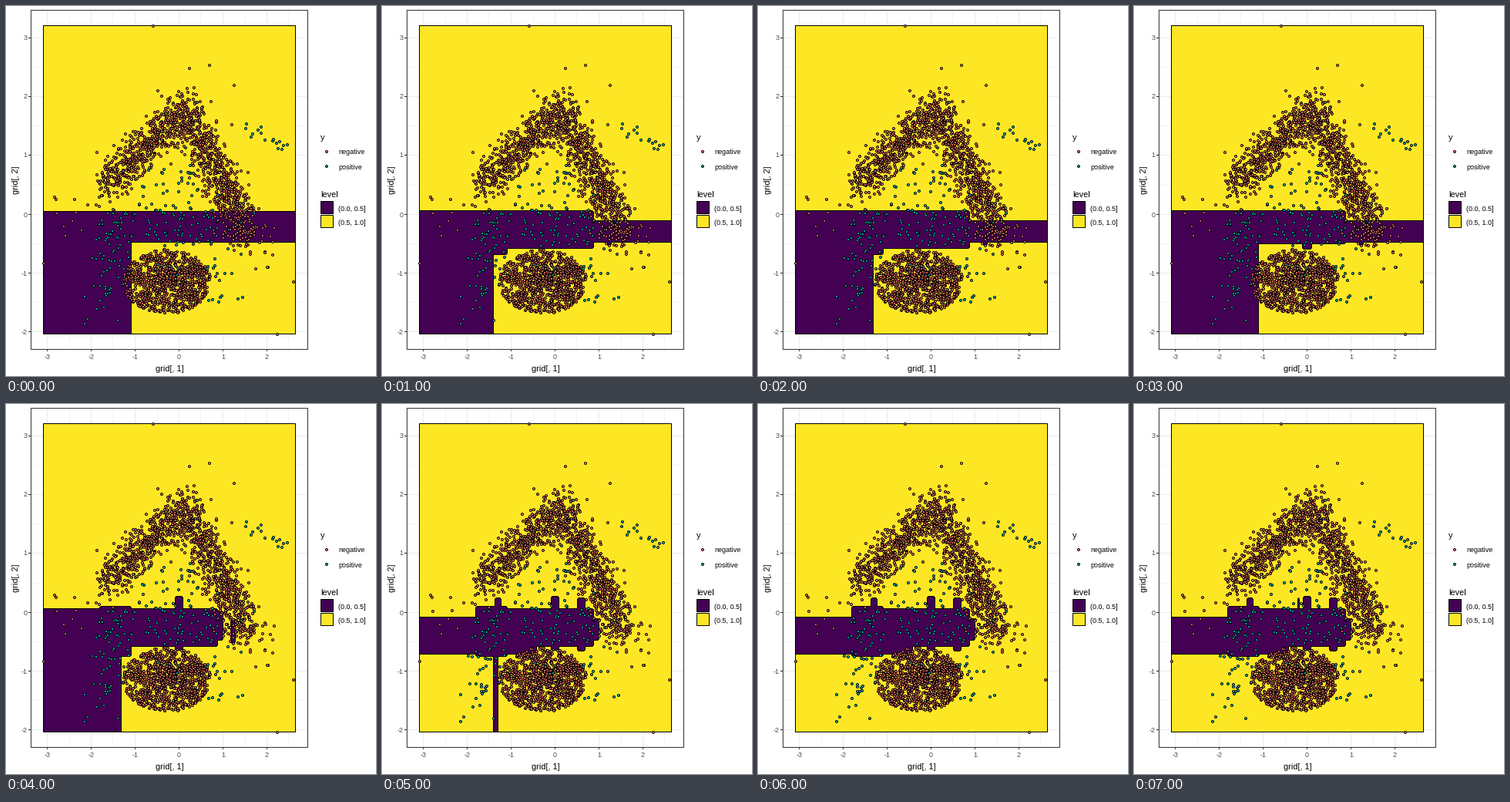
A matplotlib script for the animation above (8000 ms loop, 480 px wide and 480 px high).

```python
import numpy as np
import matplotlib.pyplot as plt
from matplotlib.animation import FuncAnimation
from matplotlib.patches import PathPatch, Rectangle
from matplotlib.path import Path

SIZE = 480
STEPS = 8
PURPLE, YELLOW = "#440154", "#FDE725"
SALMON, TEAL = "#F8766D", "#00BFC4"
PANEL = (32, 5, 391, 445)
FIELD = (48, 25, 375, 425)
LEFT, RIGHT, BOTTOM = 40, 385, 435  # beyond the field, clipped away

plt.rcParams["font.family"] = "Liberation Sans"
plt.rcParams["path.snap"] = False  # integer coordinates are pixel centres
fig = plt.figure(figsize=(SIZE / 72, SIZE / 72), dpi=72, facecolor="white")
ax = fig.add_axes([0, 0, 1, 1])
ax.set_xlim(-0.5, SIZE - 0.5)
ax.set_ylim(SIZE - 0.5, -0.5)
ax.axis("off")


def px(x):
    return round(224 + 57 * x)


def py(y):
    return round(269.7 - 76.3 * y)


def line(x0, y0, x1, y1, color):
    ax.plot([x0, x1], [y0, y1], color=color, lw=1, zorder=1,
            solid_capstyle="projecting")


def rect(x0, y0, x1, y1, fill, edge, z):
    return ax.add_patch(Rectangle((x0, y0), x1 - x0, y1 - y0, fc=fill,
                                  ec=edge, lw=1, zorder=z))


def label(x, y, text, size=9, color="black", **kw):
    ax.text(x, y, text, fontsize=size, color=color, va="baseline", **kw)


def union(boxes, cut, grow):
    """Compound path of boxes with bevelled corners, grown by a margin."""
    paths = []
    for x0, y0, x1, y1 in boxes:
        x0, y0, x1, y1 = x0 - grow, y0 - grow, x1 + grow, y1 + grow
        c = min(cut, (x1 - x0) / 2, (y1 - y0) / 2)
        paths.append(Path([(x0 + c, y0), (x1 - c, y0), (x1, y0 + c),
                           (x1, y1 - c), (x1 - c, y1), (x0 + c, y1),
                           (x0, y1 - c), (x0, y0 + c), (x0 + c, y0)],
                          closed=True))
    return Path.make_compound_path(*paths)


# Decision region: a leg at the left, a corridor, and knobs that come and go
LEG = (162, 144, 149, 161, 149)
KNOBS = (  # x, half width, top, bottom, first step, last step
    (294, 3, 280, 310, 1, 4),
    (224, 6, 295, 315, 3, 3),
    (224, 5, 249, 319, 4, 7),
    (150, 4, 251, 300, 5, 7),
    (258, 5, 251, 320, 5, 7),
    (147, 3, 300, BOTTOM, 5, 5),
    (213, 1, 251, 300, 7, 7),
)


def region_boxes(step):
    if step == 0:
        return [(LEFT, 266, RIGHT, 306), (LEFT, 266, LEG[0], BOTTOM)]
    has_leg, is_open = step < len(LEG), step < 4
    if has_leg:
        boxes = [(LEFT, 265, LEG[step], BOTTOM)]
    else:
        boxes = [(LEFT, 276, 200, 324)]
    floor = 308 if has_leg and LEG[step] > 150 else 314
    boxes.append((130, 265, 274, floor))
    if is_open:
        boxes.append((200, 278, RIGHT, 306))
    else:
        boxes.append((200, 268 if has_leg else 278, 281, 306))
    if floor > 308:
        boxes.append((121, 265 if is_open else 262, 162, 322 if is_open else 327))
    return boxes + [(x - h, top, x + h, bottom)
                    for x, h, top, bottom, first, last in KNOBS
                    if first <= step <= last]


# Panel, grid, axes
x0, y0, x1, y1 = PANEL
for v in np.arange(-3, 2.6, 0.5):
    line(px(v), y0, px(v), y1, "#EBEBEB" if v % 1 == 0 else "#F3F3F3")
for v in np.arange(-2, 3.1, 0.5):
    line(x0, py(v), x1, py(v), "#EBEBEB" if v % 1 == 0 else "#F3F3F3")
rect(*PANEL, "none", "#333333", 6)
for v in range(-3, 3):
    line(px(v), y1, px(v), y1 + 2, "#333333")
    label(px(v), 458, str(v), color="#4D4D4D", ha="center")
for v in range(-2, 4):
    line(x0 - 3, py(v), x0, py(v), "#333333")
    label(27, py(v) + 3, str(v), color="#4D4D4D", ha="right")
label(211.5, 473, "grid[, 1]", 11, ha="center")
label(15, 225, "grid[, 2]", 11, ha="center", rotation=90,
      rotation_mode="anchor")

# Field and the changing region
field = rect(*FIELD, YELLOW, "none", 2)
outline = PathPatch(Path([(0, 0)]), fc="black", lw=0, zorder=3)
region = PathPatch(Path([(0, 0)]), fc=PURPLE, lw=0, zorder=3.1)
for patch in (outline, region):
    ax.add_patch(patch)
    patch.set_clip_path(field)
rect(*FIELD, "none", "black", 4)

# Scattered samples
rng = np.random.default_rng(7)


def disc(n, x, y, rx, ry):
    angle, r = rng.uniform(0, 2 * np.pi, n), rng.uniform(0, 1, n) ** 0.6
    return np.column_stack([x + rx * r * np.cos(angle),
                            y + ry * r * np.sin(angle)])


def spread(n, xa, xb, ya, yb):
    return rng.uniform((xa, ya), (xb, yb), (n, 2))


def arm(n, start, end, sx, sy):
    """Noisy samples along a straight stroke."""
    t = rng.beta(1.4, 1.3, (n, 1))
    return start + t * np.subtract(end, start) + rng.normal(0, (sx, sy), (n, 2))


strays = [(190, 25), (48, 333), (351, 425), (372, 357),
          (263, 76), (237, 80), (295, 102)]
negative = np.vstack([strays,
                      arm(560, (122, 233), (232, 138), 6, 16),
                      arm(760, (230, 118), (314, 306), 13, 12),
                      disc(1000, 208, 357, 57, 42),
                      spread(10, 54, 110, 246, 298),
                      spread(9, 315, 346, 275, 345)])
positive = np.vstack([disc(55, 134, 320, 26, 58),
                      disc(10, 122, 390, 30, 30),
                      spread(75, 138, 275, 264, 306),
                      spread(35, 165, 250, 210, 264),
                      spread(20, 180, 305, 305, 350),
                      spread(12, 262, 310, 335, 388),
                      arm(16, (310, 152), (372, 190), 4, 5),
                      arm(12, (235, 130), (310, 290), 15, 12)])


def dots(points, colors):
    # Centres between pixels keep every ring the same shape
    p = np.floor(points) + 0.5
    ax.scatter(p[:, 0], p[:, 1], s=9, c=colors, edgecolors="black",
               linewidths=0.95, zorder=5)


samples = np.vstack([negative, positive])
colors = np.array([SALMON] * len(negative) + [TEAL] * len(positive))
order = rng.permutation(len(samples))
dots(samples[order], colors[order])

# Legends
label(407.5, 174, "y", 11)
dots(np.array([(415.5, 188.5), (415.5, 207.5)]), [SALMON, TEAL])
label(430.5, 192, "negative")
label(430.5, 211, "positive")
label(407.5, 247, "level", 11)
rect(408, 253, 424, 269, PURPLE, "black", 5)
rect(408, 271, 424, 287, YELLOW, "black", 5)
label(430.5, 265, "(0.0, 0.5]")
label(430.5, 283, "(0.5, 1.0]")


def update(step):
    boxes = region_boxes(step)
    cut = 2 if step else 0
    outline.set_path(union(boxes, cut, 0.5))
    region.set_path(union(boxes, cut, -0.5))
    return outline, region


anim = FuncAnimation(fig, update, frames=STEPS, interval=1000,
                     repeat=True, repeat_delay=0)
plt.show()
```
